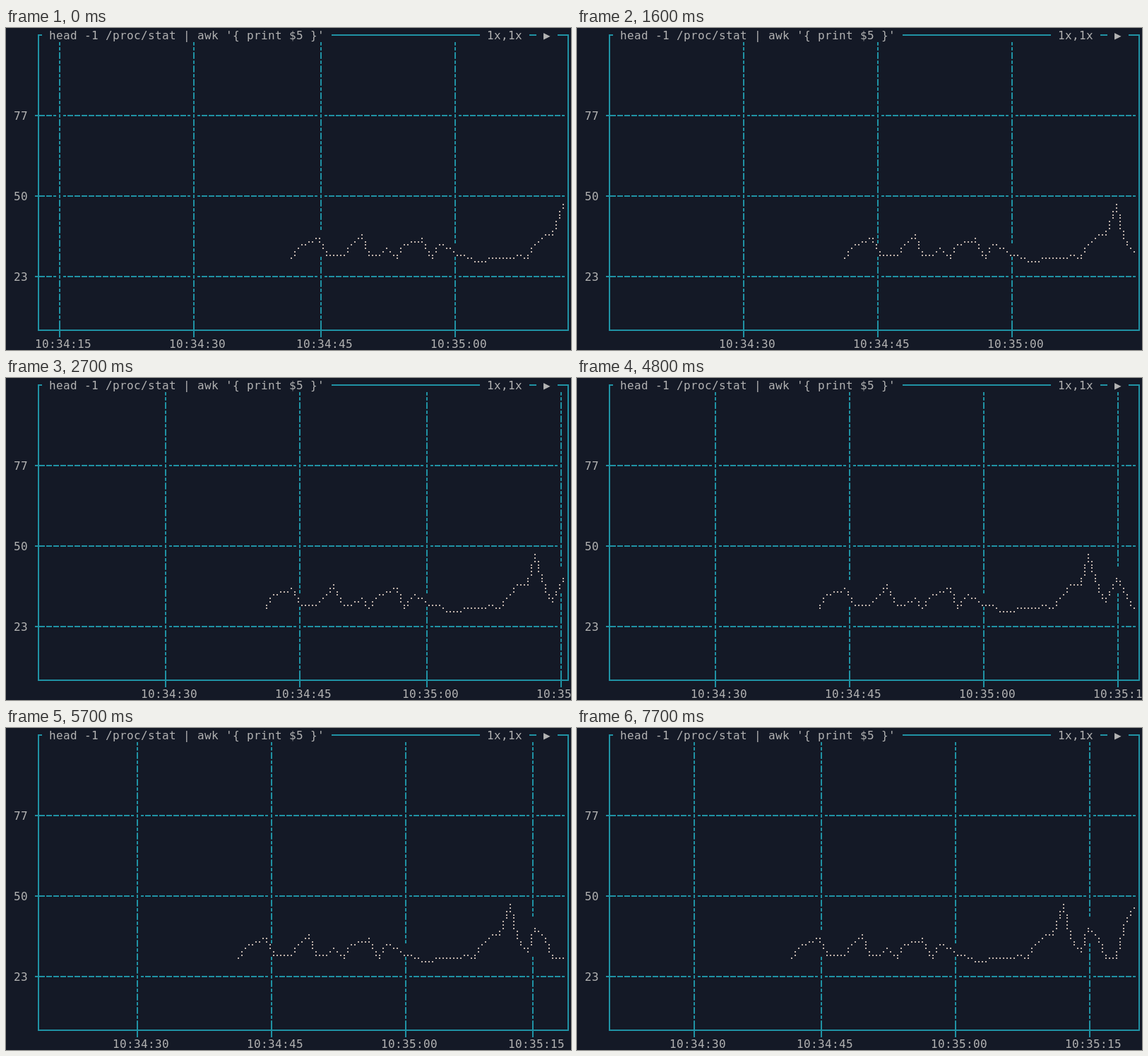
These frames come from a looping animation (800x456 px, 8 s). An HTML page with a canvas:

```html
<!DOCTYPE html>
<html lang="en">
<head>
<meta charset="utf-8">
<title>Terminal chart</title>
<style>
html, body { margin: 0; width: 100%; height: 100%; overflow: hidden; background: #141926; }
canvas { display: block; width: 800px; height: 456px; }
</style>
</head>
<body>
<canvas id="stage" width="800" height="456"></canvas>
<script>
const ctx = document.getElementById('stage').getContext('2d');
const BG = '#141926', LINE = '#2092a4', TEXT = '#b2b2b2', DOT = '#c2b5ad';
const CW = 10, CH = 19, PAD = 1;
const LOOP = 8000;
const STEPS = [600, 1600, 2700, 3700, 4800, 5700, 6700, 7700];
const LAST_DOT = 157;

// One sample per second, in braille dot rows from the top
const samples = [
  68, 64, 63, 62, 67, 67, 67, 64, 61, 67, 67, 65, 68, 64, 63, 62, 68, 64, 65, 67,
  67, 69, 69, 68, 68, 68, 67, 68, 64, 61, 61, 52, 62, 66, 59, 62, 68, 68, 59, 53
];
const sampleX = i => i < 19 ? 80.55 + 2.49 * i : 79.52 + 2.5 * i;

const left = col => PAD + col * CW;
const top_ = row => PAD + row * CH;
const midX = col => left(col) + 5;
const midY = row => top_(row) + 9;

function hLine(x1, x2, y) { ctx.fillRect(x1, y - 1, x2 - x1, 2); }
function vLine(x, y1, y2) { ctx.fillRect(x - 1, y1, 2, y2 - y1); }

// Terminal text: each character sits in its own cell
function put(str, col, row) {
  ctx.fillStyle = TEXT;
  [...str].forEach((ch, i) => ctx.fillText(ch, left(col + i), top_(row) + 15));
}

function hDash(col, row) {
  const x = left(col), y = midY(row);
  hLine(x, x + 4, y);
  hLine(x + 6, x + 10, y);
}

function vDash(col, row) {
  const unit = CH / 8;
  for (let k = 0; k < 3; k++) {
    const y = top_(row) + 3 * k * unit;
    vLine(midX(col), y, y + 2 * unit);
  }
}

function drawFrame() {
  const l = midX(4), r = midX(79), t = midY(0), b = midY(22);
  ctx.fillStyle = LINE;
  vLine(l, t - 1, b + 1);
  vLine(r, t - 1, b + 1);
  hLine(l - 1, r + 1, b);
  hLine(l - 1, left(5), t);
  hLine(left(46), left(67), t);
  hLine(left(74), left(75), t);
  hLine(left(78), r + 1, t);
  put("head -1 /proc/stat | awk '{ print $5 }'", 6, 0);
  put('1x,1x', 68, 0);
  put('▶', 76, 0);
}

function gridTicks(step) {
  const ticks = [];
  for (let k = -1; k < 4; k++) {
    const col = Math.floor(26 - 1.25 * step + 18.75 * k);
    if (col < 6 || col > 78) continue;
    const sec = 30 + 15 * k;
    const label = '10:' + (34 + Math.floor(sec / 60)) + ':' + String(sec % 60).padStart(2, '0');
    ticks.push({ col, label });
  }
  return ticks;
}

function drawGrid(step) {
  const ticks = gridTicks(step);
  const cols = new Set(ticks.map(tick => tick.col));
  [['77', 6], ['50', 12], ['23', 18]].forEach(([label, row]) => {
    ctx.fillStyle = LINE;
    hLine(left(4), left(5), midY(row));
    for (let col = 5; col < 79; col++) if (!cols.has(col)) hDash(col, row);
    put(label, 1, row);
  });
  ticks.forEach(({ col, label }) => {
    ctx.fillStyle = LINE;
    for (let row = 1; row < 22; row++) vDash(col, row);
    vLine(midX(col), top_(22), top_(23));
    put(label, col - 3, 23);
  });
}

function curveDots(step) {
  const dots = new Map();
  const add = (x, y) => {
    if (x <= LAST_DOT) dots.set(x + ',' + y, [x, y]);
  };
  const at = i => [Math.floor(sampleX(i) - 2.5 * step), samples[i]];
  for (let i = 0; i < 31 + step; i++) {
    const [x1, y1] = at(i), [x2, y2] = at(i + 1);
    const n = Math.max(x2 - x1, Math.abs(y2 - y1));
    for (let k = 0; k <= n; k++) {
      const f = k / n;
      add(Math.round(x1 + (x2 - x1) * f - 0.01), Math.round(y1 + (y2 - y1) * f));
    }
  }
  return [...dots.values()];
}

function drawCurve(step) {
  const dots = curveDots(step);
  // A braille cell replaces whatever grid line was in it
  ctx.fillStyle = BG;
  dots.forEach(([x, y]) => ctx.fillRect(left(x >> 1), top_(y >> 2), CW, CH));
  ctx.fillStyle = DOT;
  dots.forEach(([x, y]) => {
    ctx.fillRect(Math.round(2.5 + 5 * x), Math.round(2.4 + 4.75 * y), 2, 2);
  });
}

function draw(step) {
  ctx.fillStyle = BG;
  ctx.fillRect(0, 0, 800, 456);
  ctx.font = '16px "DejaVu Sans Mono", monospace';
  ctx.textBaseline = 'alphabetic';
  drawGrid(step);
  drawCurve(step);
  drawFrame();
}

const start = performance.now();
let shown = -1;
function tick() {
  const time = (performance.now() - start) % LOOP;
  const step = STEPS.filter(at => at <= time).length;
  if (step !== shown) draw(shown = step);
  requestAnimationFrame(tick);
}
tick();
</script>
</body>
</html>
```
